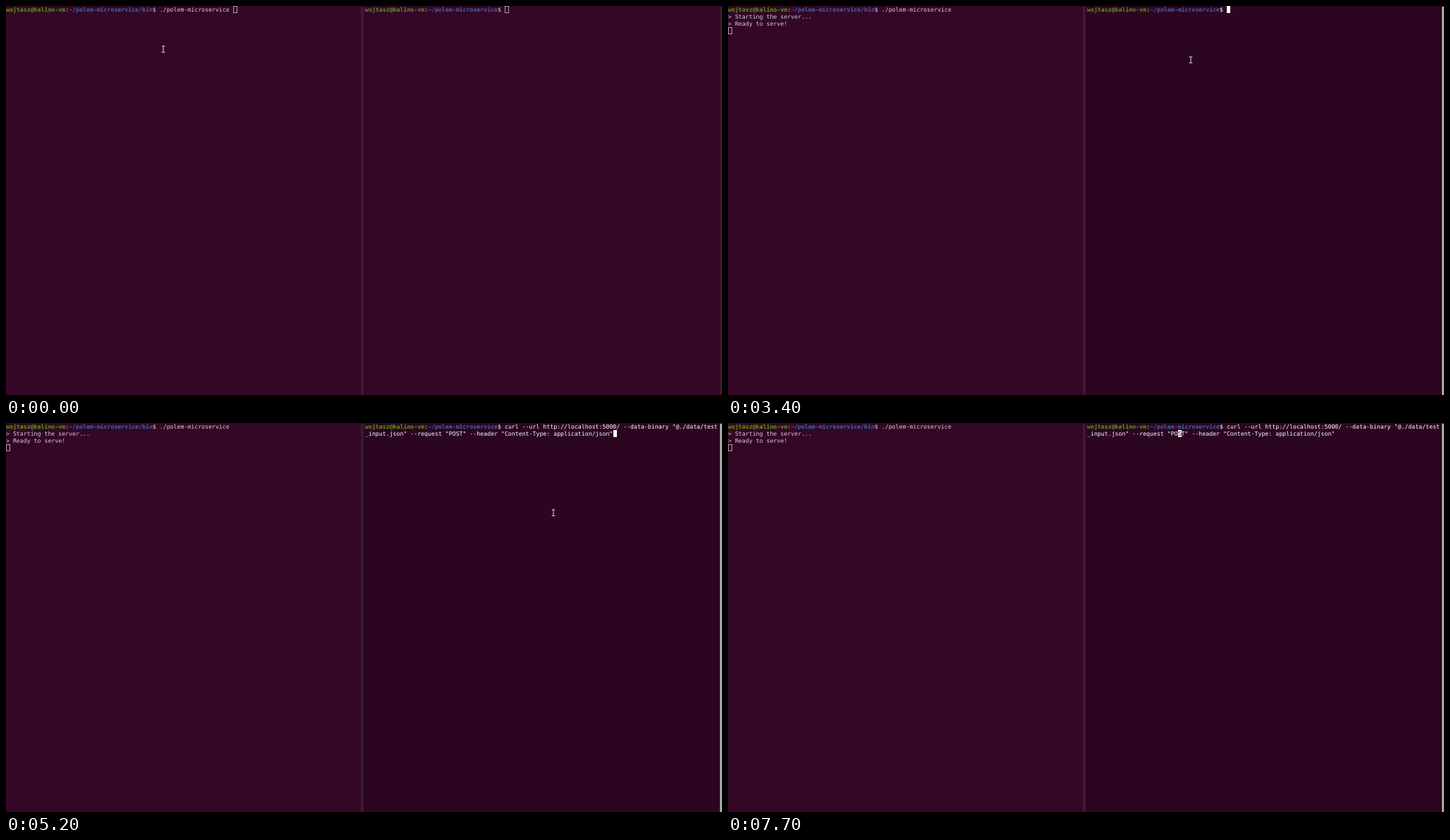
These frames come from a looping animation (1015x552 px, 8 s). An HTML page:

```html
<!DOCTYPE html>
<html lang="en">
<head>
<meta charset="utf-8">
<title>Terminal session</title>
<style>
  html, body { margin: 0; width: 100%; height: 100%; overflow: hidden; background: #340726; }
  .pane { position: absolute; top: 0; height: 552px; overflow: hidden; background: #340726; color: #d6ced3; }
  .pane.active { background: #2c0521; color: #fff; }
  #left { left: 0; width: 507px; }
  #right { left: 507px; width: 508px; }
  pre, .cursor {
    position: absolute; top: 0; margin: 0; white-space: pre;
    font: 8.23px/10px "DejaVu Sans Mono", monospace; text-rendering: geometricPrecision;
  }
  #right pre { left: 2px; }
  b { color: #559f0c; }
  b + b { color: #3a69aa; }
  .bar { position: absolute; top: 1px; right: 0; width: 3px; height: 551px; background: #3c1a30; }
  #left .bar { width: 4px; }
  .active .bar { background: #a9a7a6; }
  .cursor { box-sizing: border-box; width: 6px; height: 10px; border: 1px solid #ae9fa9; color: transparent; }
  .cursor.solid { width: 5px; border: 0; background: #fff; color: #2c0521; }
  #menu {
    position: absolute; left: 656px; top: 77px; width: 86.5px; height: 116.5px; padding-top: 2.3px;
    box-sizing: border-box; border-radius: 2px; background: #3f3e39; color: #f0efed;
    font: 7.7px/14.03px "Noto Sans", "Open Sans", sans-serif; text-rendering: geometricPrecision;
  }
  #menu div { height: 14.03px; padding-left: 16.3px; white-space: pre; }
  #menu .off { color: #8b8a85; }
  #menu .hover { background: #575652; }
  #pointer { position: absolute; left: 0; top: 0; width: 12px; height: 12px; overflow: visible; }
</style>
</head>
<body>
<div class="pane" id="left"><pre></pre><div class="cursor"></div><div class="bar"></div></div>
<div class="pane" id="right"><pre></pre><div class="cursor"></div><div class="bar"></div></div>
<div id="menu"><div class="off">Copy</div><div class="off">Copy as HTML</div><div>Paste</div><div>Read-Only</div><div>Preferences</div><div>New Window</div><div>New Tab</div><div>Show Menubar</div></div>
<svg id="pointer">
  <g id="beam" fill="none">
    <path d="M-2.5-4H2.5M0-4V4.6M-2.5 4.6H2.5" stroke="#111" stroke-width="2"/>
    <path d="M-2.3-4H2.3M0-4V4.6M-2.3 4.6H2.3" stroke="#e4e0e2"/>
  </g>
  <path id="arrow" d="M.4.5V8.6L2.2 7 3.5 9.8 4.8 9.2 3.6 6.5H6Z" fill="#222" stroke="#eee" stroke-width=".8"/>
</svg>
<script>
const LOOP = 8000, STEP = 100, CELL = 4.955, ROW = 10;
const $ = s => document.querySelector(s);
const show = (el, on) => el.style.display = on ? '' : 'none';
const prompt = path => `<b>wojtasz@kalino-vm</b>:<b>${path}</b>$ `;

const leftPrompt = prompt('~/polem-microservice/bin') + './polem-microservice';
const rightPrompt = prompt('~/polem-microservice');
const commandRows = [
  'curl --url http://localhost:5000/ --data-binary "@./data/test',
  '_input.json" --request "POST" --header "Content-Type: application/json"'
];

// Pointer stops: time, x, y
const stops = [
  [600, 223, 61], [900, 359, 72], [3000, 359, 72], [3300, 656, 76],
  [4100, 656, 77], [4400, 690, 119], [4600, 688, 111],
  [4700, 688, 111], [5200, 776, 127]
];

function pointerAt(t) {
  const i = stops.findIndex(s => s[0] > t);
  if (i < 0) return stops.at(-1).slice(1);
  if (i === 0) return stops[0].slice(1);
  const [t0, x0, y0] = stops[i - 1], [t1, x1, y1] = stops[i];
  const k = (t - t0) / (t1 - t0);
  return [x0 + (x1 - x0) * k, y0 + (y1 - y0) * k];
}

function setText(el, html) {
  if (el.shown !== html) el.innerHTML = el.shown = html;
}

function setCursor(id, col, row, solid, visible, char = '') {
  const el = $(id + ' .cursor');
  show(el, visible);
  el.classList.toggle('solid', solid);
  el.textContent = char;
  el.style.left = Math.round(col * CELL) + (id === '#right' ? 2 : 0) + 'px';
  el.style.top = row * ROW + 'px';
}

function drawLeft(t) {
  const active = t >= 900 && t < 3300;
  const started = t >= 1900, ready = t >= 2000;
  $('#left').classList.toggle('active', active);
  setText($('#left pre'), leftPrompt + (started ? '\n&gt; Starting the server...' : '') +
    (ready ? '\n&gt; Ready to serve!' : ''));
  setCursor('#left', started ? 0 : 65, ready ? 3 : started ? 2 : 0, active, t < 2500 || t >= 3100);
}

function drawRight(t) {
  const active = t >= 3300, pasted = t >= 4800, menuOpen = t >= 3800 && !pasted;
  $('#right').classList.toggle('active', active);
  setText($('#right pre'), rightPrompt + (pasted ? commandRows.join('\n') : ''));
  let col = pasted ? 71 : 40;
  if (t >= 5800) col = 70;
  // Held arrow key repeats 31 times a second
  if (t >= 6300) col = Math.round(69 - 0.031 * (Math.min(t, 7700) - 6300));
  setCursor('#right', col, pasted ? 1 : 0, active && !menuOpen, t < 5400 || t >= 5800,
    pasted ? commandRows[1][col] : '');
  return menuOpen;
}

function draw(t) {
  drawLeft(t);
  const menuOpen = drawRight(t);
  const [x, y] = pointerAt(t);
  const arrow = t >= 4000 && t < 4800;
  show($('#pointer'), t < 1900 || (t >= 3100 && t < 5800));
  show($('#arrow'), arrow);
  show($('#beam'), !arrow);
  $('#pointer').style.transform = `translate(${x}px,${y}px)`;

  show($('#menu'), menuOpen);
  const hovered = Math.floor((y - 79.3) / 14.03);
  [...$('#menu').children].forEach((item, i) =>
    item.classList.toggle('hover', i === hovered && !item.classList.contains('off')));
}

function tick() {
  draw(Math.floor(performance.now() % LOOP / STEP) * STEP);
  requestAnimationFrame(tick);
}
tick();
</script>
</body>
</html>
```
